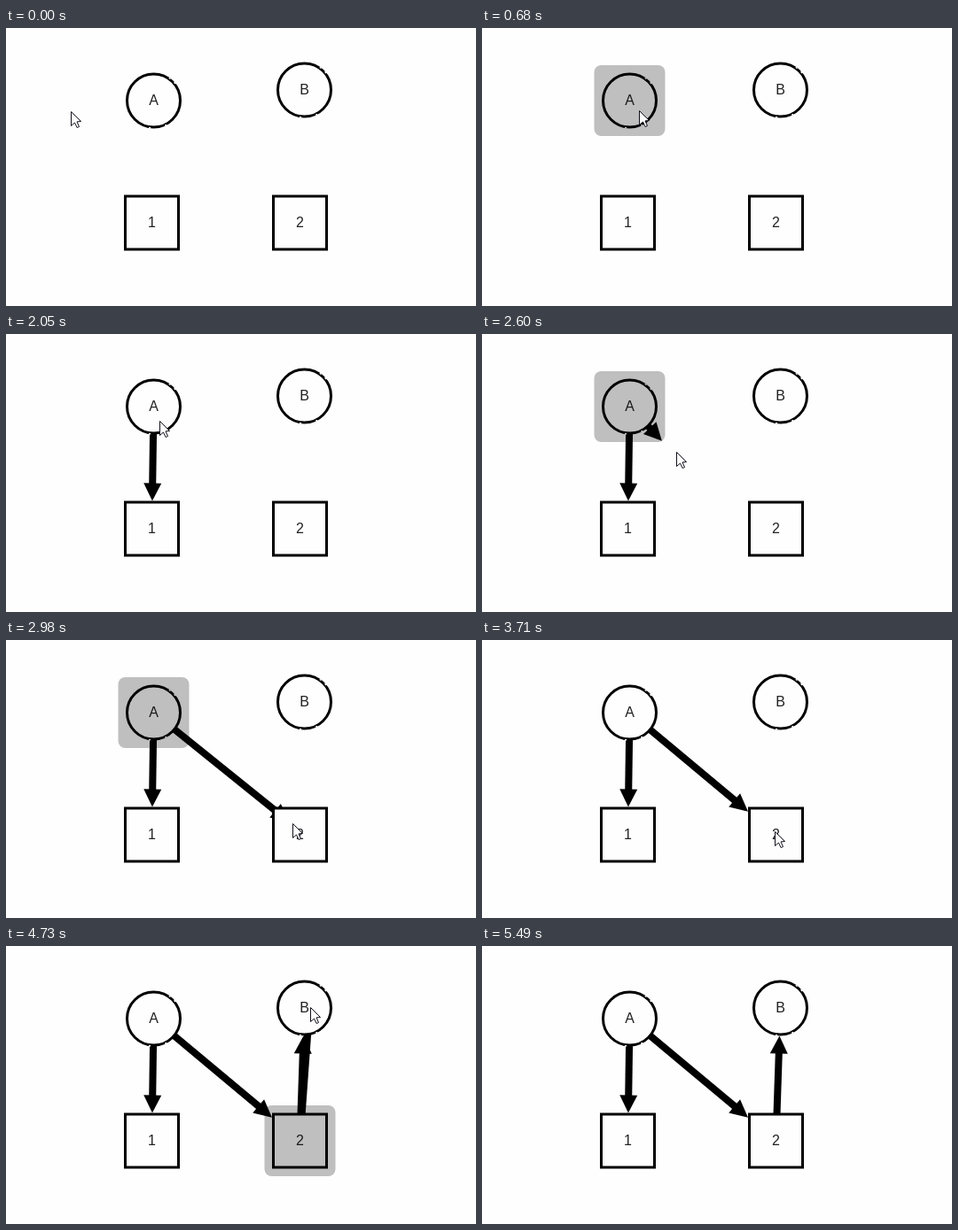
These frames come from a looping animation (530x314 px, 6000 ms). An HTML page with a canvas:

```html
<!DOCTYPE html>
<html lang="en">
<head>
<meta charset="utf-8">
<title>Drawing edges between nodes</title>
<style>
  html, body { margin: 0; width: 100%; height: 100%; overflow: hidden; background: #fefefe; }
  canvas { display: block; }
</style>
</head>
<body>
<canvas id="stage" width="530" height="314"></canvas>
<script>
const ctx = document.getElementById('stage').getContext('2d');
const LOOP = 6000;
const TICK = 137; // typical pause between pointer steps
const PAPER = '#fefefe';
const REACH = 31.5; // node centre to outer border

const A = { x: 166.5, y: 82, label: 'A', round: true };
const B = { x: 336.5, y: 70, label: 'B', round: true };
const one = { x: 164.5, y: 220, label: '1' };
const two = { x: 331.5, y: 220, label: '2' };
const nodes = [A, B, one, two];

// Each drag: node selected, loose edge follows the pointer, edge snaps, drag ends
const drags = [
  { from: A, to: one, select: 680, pull: 960, snap: 1100, drop: 1590 },
  { from: A, to: two, select: 2450, pull: 2600, snap: 3340, drop: 3580 },
  { from: two, to: B, select: 4140, pull: 4440, snap: 4730, drop: 5100 }
];

const linear = p => p;
const easeIn = p => 1 - Math.sqrt(1 - p);
const easeOut = p => 1 - (1 - p) ** 2;
const cubicOut = p => 1 - (1 - p) ** 3;
const mix = (a, b, p) => ({ x: a.x + (b.x - a.x) * p, y: a.y + (b.y - a.y) * p });

// Pointer glides: first step, last step, destination, easing
const home = { x: 73, y: 94 };
const glide = (first, last, x, y, ease = linear) => ({ first, last, to: { x, y }, ease });
const glides = [
  glide(140, 540, 177, 93),
  glide(810, 960, 163, 234),
  glide(1750, 2050, 173, 98, cubicOut),
  glide(2600, 2840, 312, 202),
  glide(2980, 3100, 327, 209, easeOut),
  glide(3710, 3710, 330, 216),
  glide(4290, 4440, 331, 128, easeIn),
  glide(4590, 4730, 343, 69, easeOut),
  glide(5230, 5350, 458, 282)
];
const POINTER_GONE = 5490;

// The pointer moves in visible steps, not smoothly
function pointerAt(t) {
  let pos = home;
  for (const { first, last, to, ease } of glides) {
    if (t < first) break;
    const gaps = Math.round((last - first) / TICK);
    const pause = (last - first) / gaps || TICK;
    const step = Math.min(gaps, Math.floor((t - first) / pause)) + 1;
    pos = mix(pos, to, ease(step / (gaps + 1)));
  }
  return { x: Math.round(pos.x), y: Math.round(pos.y) };
}

// The loose edge lags a little behind the pointer
const looseEnd = t => mix(pointerAt(t - TICK), pointerAt(t), 0.65);

function polygon(points) {
  ctx.beginPath();
  points.forEach(([x, y]) => ctx.lineTo(x, y));
  ctx.closePath();
}

function arrow(from, tip) {
  const len = Math.hypot(tip.x - from.x, tip.y - from.y);
  ctx.save();
  ctx.translate(from.x, from.y);
  ctx.rotate(Math.atan2(tip.y - from.y, tip.x - from.x));
  ctx.fillStyle = '#000';
  ctx.fillRect(0, -4, Math.max(0, len - 18), 8);
  polygon([[len, 0], [len - 20, -10], [len - 20, 10]]);
  ctx.fill();
  ctx.restore();
}

// Where the line between two centres meets the border of the second node
function border(from, to) {
  const dx = from.x - to.x, dy = from.y - to.y;
  const size = to.round ? Math.hypot(dx, dy) : Math.max(Math.abs(dx), Math.abs(dy));
  return { x: to.x + dx * REACH / size, y: to.y + dy * REACH / size };
}

function drawNode(n) {
  ctx.beginPath();
  if (n.round) ctx.arc(n.x, n.y, 30, 0, Math.PI * 2);
  else ctx.rect(n.x - 30, n.y - 30, 60, 60);
  ctx.fillStyle = PAPER;
  ctx.fill();
  ctx.strokeStyle = '#000';
  ctx.lineWidth = 3;
  ctx.stroke();
  if (n.round) {
    // small nicks in the outline
    ctx.strokeStyle = PAPER;
    ctx.lineWidth = 1.5;
    for (const a of [-0.98, -0.73, 1.08, 1.68]) {
      ctx.beginPath();
      ctx.arc(n.x, n.y, 31, a, a + 0.07);
      ctx.stroke();
    }
  }
  ctx.fillStyle = '#222';
  ctx.fillText(n.label, n.x, n.y + 5);
}

function drawSelection(n) {
  ctx.fillStyle = 'rgba(0, 0, 0, 0.25)';
  ctx.beginPath();
  ctx.roundRect(n.x - 40, n.y - 40, 80, 80, 8);
  ctx.fill();
}

function drawPointer({ x, y }) {
  ctx.save();
  ctx.translate(x + 0.5, y + 0.5);
  polygon([[0, 0], [0, 16], [4, 12.5], [6.6, 18], [9, 17], [6.5, 11.4], [11, 11]]);
  ctx.fillStyle = '#fff';
  ctx.fill();
  ctx.strokeStyle = '#10101c';
  ctx.lineWidth = 1;
  ctx.stroke();
  ctx.restore();
}

function draw(t) {
  const drag = drags.find(d => t >= d.select && t < d.drop);

  ctx.fillStyle = PAPER;
  ctx.fillRect(0, 0, 530, 314);
  ctx.font = '16px "Liberation Sans", Arial, sans-serif';
  ctx.textAlign = 'center';

  for (const d of drags) if (t >= d.snap) arrow(d.from, border(d.from, d.to));
  if (drag && t >= drag.pull) arrow(drag.from, looseEnd(t));
  nodes.forEach(drawNode);
  if (drag) drawSelection(drag.from);
  if (t < POINTER_GONE) drawPointer(pointerAt(t));
}

const start = performance.now();
function frame() {
  draw((performance.now() - start) % LOOP);
  requestAnimationFrame(frame);
}
frame();
</script>
</body>
</html>
```
